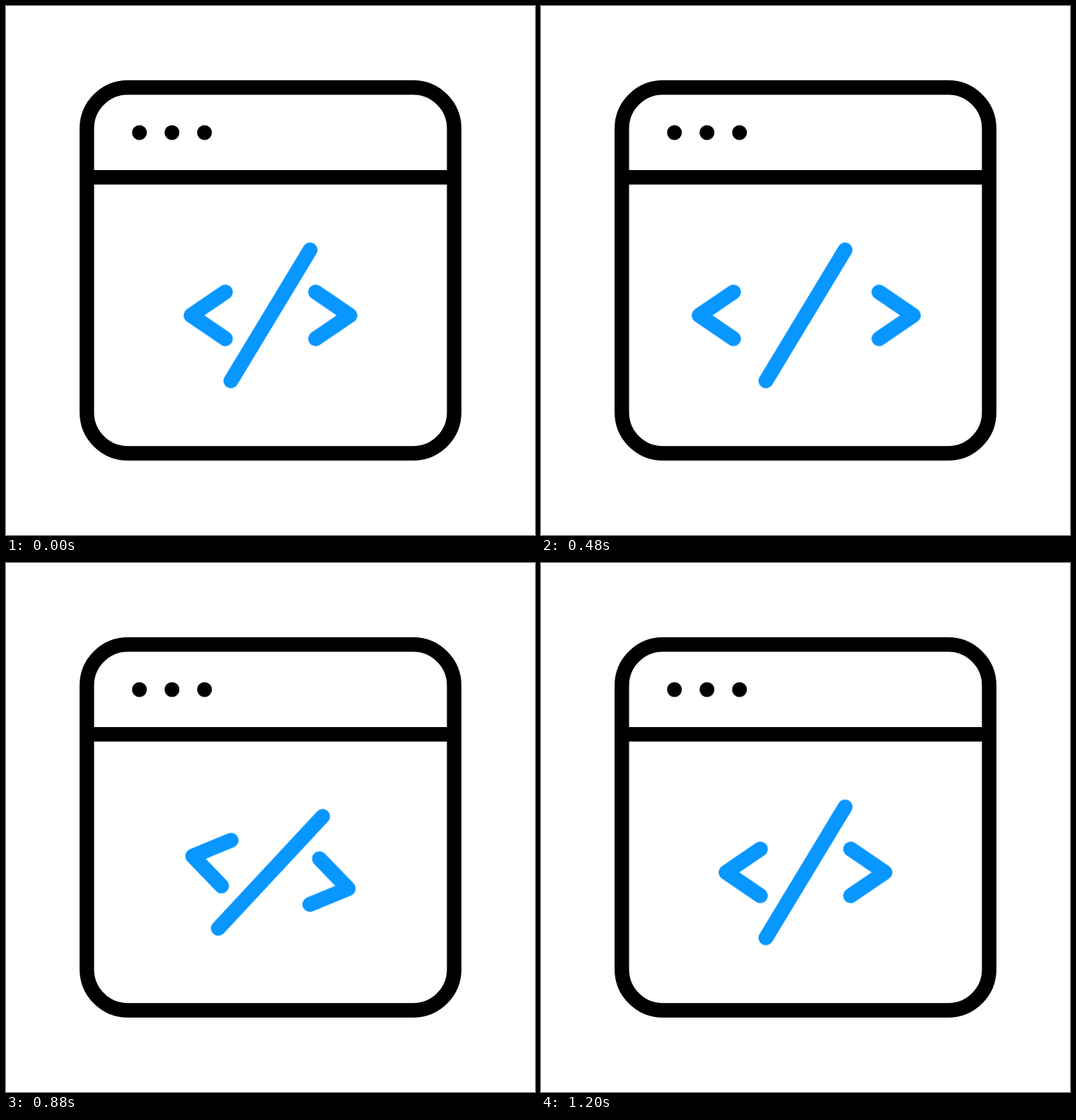
An HTML page without scripts that plays this animation: 748 by 748 pixels, repeating every 1360 ms.

```html
<!DOCTYPE html>
<html lang="en">
<head>
<meta charset="utf-8">
<title>Code window</title>
<style>
  html, body { margin: 0; width: 100%; height: 100%; overflow: hidden; background: #fff; }
  svg { display: block; width: 100%; height: 100%; }

  .window { fill: none; stroke: #000; stroke-width: 20.5; }
  .code { fill: none; stroke: #0896ff; stroke-width: 21; stroke-linecap: round; stroke-linejoin: round; }

  /* One tick is 80 ms, 17 ticks per loop */
  .code, .bracket { animation: 1.36s infinite; }
  .code { animation-name: wiggle; }
  .bracket { animation-name: spread; }
  .left { --reach: -64.5px; }
  .right { --reach: 68px; }

  @keyframes spread {
    0% { transform: translateX(0); animation-timing-function: steps(4); }
    23.529% { transform: translateX(var(--reach)); animation-timing-function: steps(1); }
    29.411% { transform: translateX(calc(var(--reach) * .885)); animation-timing-function: steps(3); }
    47.058%, 100% { transform: translateX(0); }
  }

  @keyframes wiggle {
    0%, 47.058% { transform: rotate(0deg); animation-timing-function: steps(2); }
    58.823% { transform: rotate(15.7deg); animation-timing-function: steps(1); }
    64.705% { transform: rotate(11.8deg); animation-timing-function: steps(2); }
    76.47% { transform: rotate(-16.2deg); animation-timing-function: steps(2); }
    88.235%, 100% { transform: rotate(0deg); }
  }
</style>
</head>
<body>
<svg viewBox="0 0 748 748">
  <g class="window">
    <rect x="114.3" y="115.3" width="519.4" height="517.2" rx="58"/>
    <path d="M114 242.3H634"/>
  </g>

  <circle id="dot" cx="188.7" cy="179" r="10.5"/>
  <use href="#dot" x="46"/>
  <use href="#dot" x="92"/>

  <g transform="translate(374 437.4)">
    <g class="code">
      <path d="M-56 92.6L56-92.6"/>
      <path class="bracket left" d="M-63.8-33L-112.3 0L-63.8 33"/>
      <path class="bracket right" d="M63.8-33L112.3 0L63.8 33"/>
    </g>
  </g>
</svg>
</body>
</html>
```
